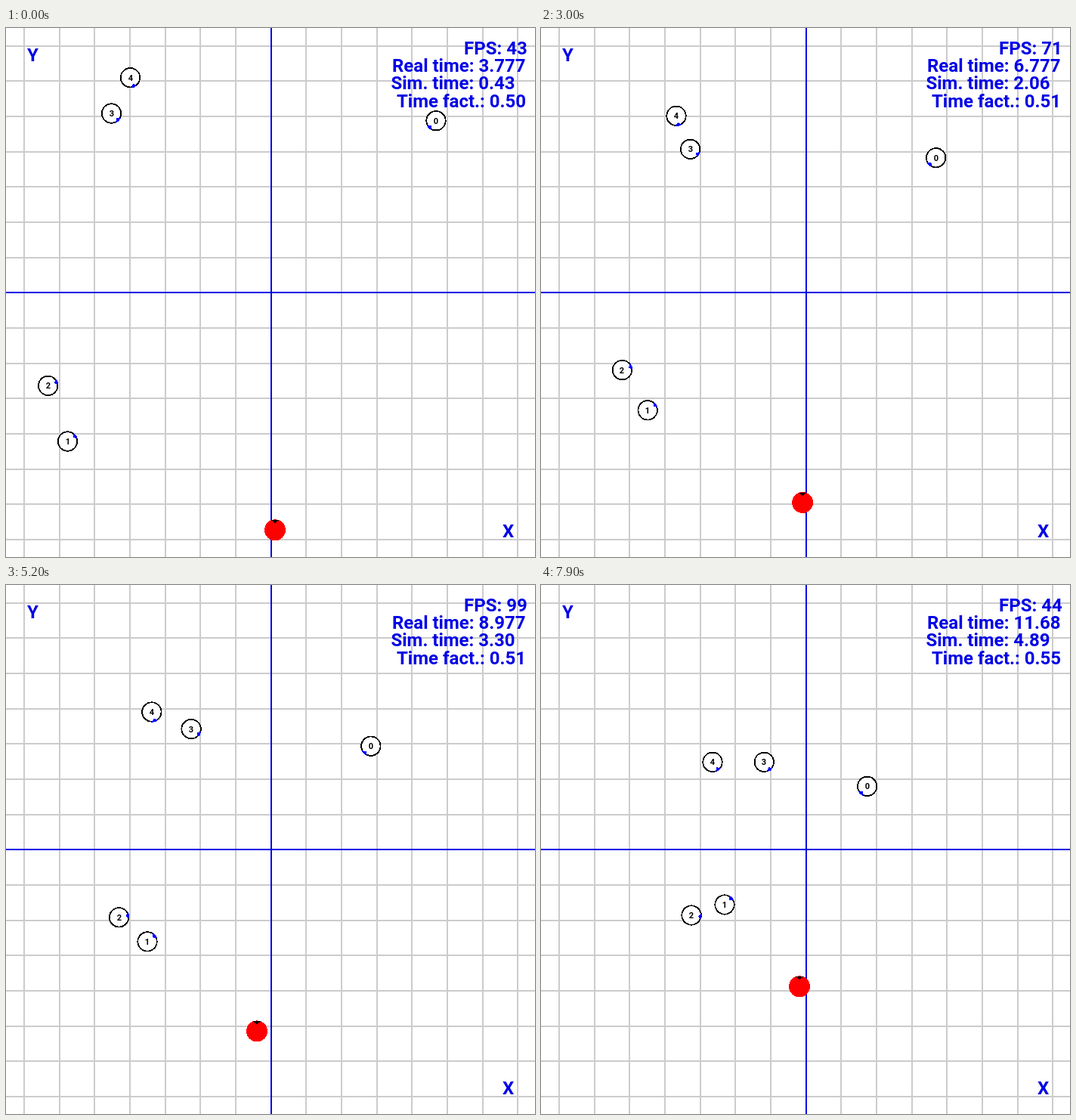
An HTML page that plays this animation: 700x700 px, repeating every 8000 ms.

```html
<!DOCTYPE html>
<html lang="en">
<head>
<meta charset="utf-8">
<title>Robot simulation</title>
<style>
  html, body { margin: 0; width: 100%; height: 100%; overflow: hidden; background: #fff; }
  svg { display: block; width: 100vw; height: 100vh; }
  text { font: 700 24px Roboto, Arial, sans-serif; font-kerning: none; fill: #0000e6; white-space: pre; }
  .axis { fill: #0000e6; }
  .grid { fill: #ccc; }
  .shape { shape-rendering: crispEdges; }
  .ring { fill: #fff; stroke: #000; stroke-width: 1.8; }
  .label { font-size: 11px; fill: #000; text-anchor: middle; }
</style>
</head>
<body>
<svg id="stage" viewBox="0 0 700 700"></svg>
<script>
const LOOP = 8000, STEP = 100, CELL = 700 / 15;
const SIM_START = .43, SIM_END = 4.89, START_LAG = .16;
const stage = document.getElementById('stage');

function add(tag, attrs, text, parent = stage) {
  const node = document.createElementNS('http://www.w3.org/2000/svg', tag);
  for (const key in attrs) node.setAttribute(key, attrs[key]);
  if (text !== undefined) node.textContent = text;
  return parent.appendChild(node);
}

// Point at u (0 to 1) on a chain of cubic Bezier curves.
function along(points, u) {
  const count = (points.length - 1) / 3;
  const i = Math.min(Math.floor(u * count), count - 1);
  const v = u * count - i, w = 1 - v;
  const weights = [w * w * w, 3 * w * w * v, 3 * w * v * v, v * v * v];
  return [0, 1].map(axis =>
    weights.reduce((sum, weight, k) => sum + weight * points[3 * i + k][axis], 0));
}

function heading(points, u) {
  const [x0, y0] = along(points, Math.max(0, u - .01));
  const [x1, y1] = along(points, Math.min(1, u + .01));
  return Math.atan2(y1 - y0, x1 - x0) * 180 / Math.PI;
}

// Grid and axes, with whole-pixel lines
for (const pass of ['grid', 'axis']) {
  for (let k = -7; k <= 7; k++) {
    if ((k === 0) !== (pass === 'axis')) continue;
    const p = 350 + k * CELL;
    add('rect', { class: pass, x: Math.floor(p + .001), y: 0, width: 2, height: 700 });
    add('rect', { class: pass, x: 0, y: Math.ceil(p - .001) - 1, width: 700, height: 2 });
  }
}
add('text', { x: 28, y: 44 }, 'Y');
add('text', { x: 657, y: 674 }, 'X');

const robots = [
  [[569, 122.7], [524, 171], [478, 218], [431.7, 266.3]],
  [[81.5, 547], [144, 504], [192.5, 472.4], [243, 423]],
  [[55.7, 473.3], [107, 452], [157, 430.5], [199, 437]],
  [[139.5, 113], [195, 171], [258, 186], [295.3, 234.3]],
  [[164.5, 65.7], [182, 106.5], [183, 178], [227, 234.3]]
].map((path, id) => {
  const body = add('g');
  add('circle', { class: 'ring shape', r: 12.7 }, undefined, body);
  const nose = add('path', { class: 'shape', d: 'M13-4.5L14 0L13 4.5L9 0Z', fill: '#00f' }, undefined, body);
  return { path, body, nose, label: add('text', { class: 'label' }, id) };
});

const target = {
  path: [[356, 664.3], [369, 632], [344.5, 637], [332.5, 609], [336, 585], [318, 563], [342, 531.3]],
  body: add('g')
};
add('circle', { class: 'shape', r: 14, fill: '#f00' }, undefined, target.body);
add('path', { class: 'shape', d: 'M-5-13H5L0-9Z' }, undefined, target.body);

const [fpsText, realText, simText, factorText] =
  [[606, 35], [511, 58], [509.5, 81], [517, 105]].map(([x, y]) => add('text', { x, y }));

const noise = n => { const s = Math.sin(n * 127.1 + 3.7) * 43758.5453; return s - Math.floor(s); };

function place({ path, body }, u) {
  const [x, y] = along(path, u);
  body.setAttribute('transform', `translate(${x} ${y})`);
  return [x, y];
}

function draw(step) {
  const seconds = step * STEP / 1000;
  const sim = SIM_START + .5283 * seconds + .0046 * seconds ** 2;

  // Robots pull away gently, then keep a steady speed.
  const travel = s => s - START_LAG * (1 - Math.exp(-s / START_LAG));
  const u = Math.min(1, travel(sim - SIM_START) / travel(SIM_END - SIM_START));

  for (const robot of robots) {
    const [x, y] = place(robot, u);
    robot.nose.setAttribute('transform', `rotate(${heading(robot.path, u)})`);
    robot.label.setAttribute('x', Math.round(x));
    robot.label.setAttribute('y', Math.round(y) + 4);
  }
  place(target, u);

  const fps = Math.min(100, Math.round(32 + 75 * noise(step)));
  const factor = .5 + .06 * noise(step + 200);
  fpsText.textContent = `FPS: ${fps}`;
  realText.textContent = `Real time: ${(3.777 + seconds).toPrecision(4)}`;
  simText.textContent = `Sim. time: ${sim.toFixed(2)}`;
  factorText.textContent = `Time fact.: ${factor.toFixed(2)}`;
}

const start = performance.now();
let shown = -1;
function tick() {
  const step = Math.floor((performance.now() - start) % LOOP / STEP);
  if (step !== shown) draw(shown = step);
  requestAnimationFrame(tick);
}
tick();
</script>
</body>
</html>
```
